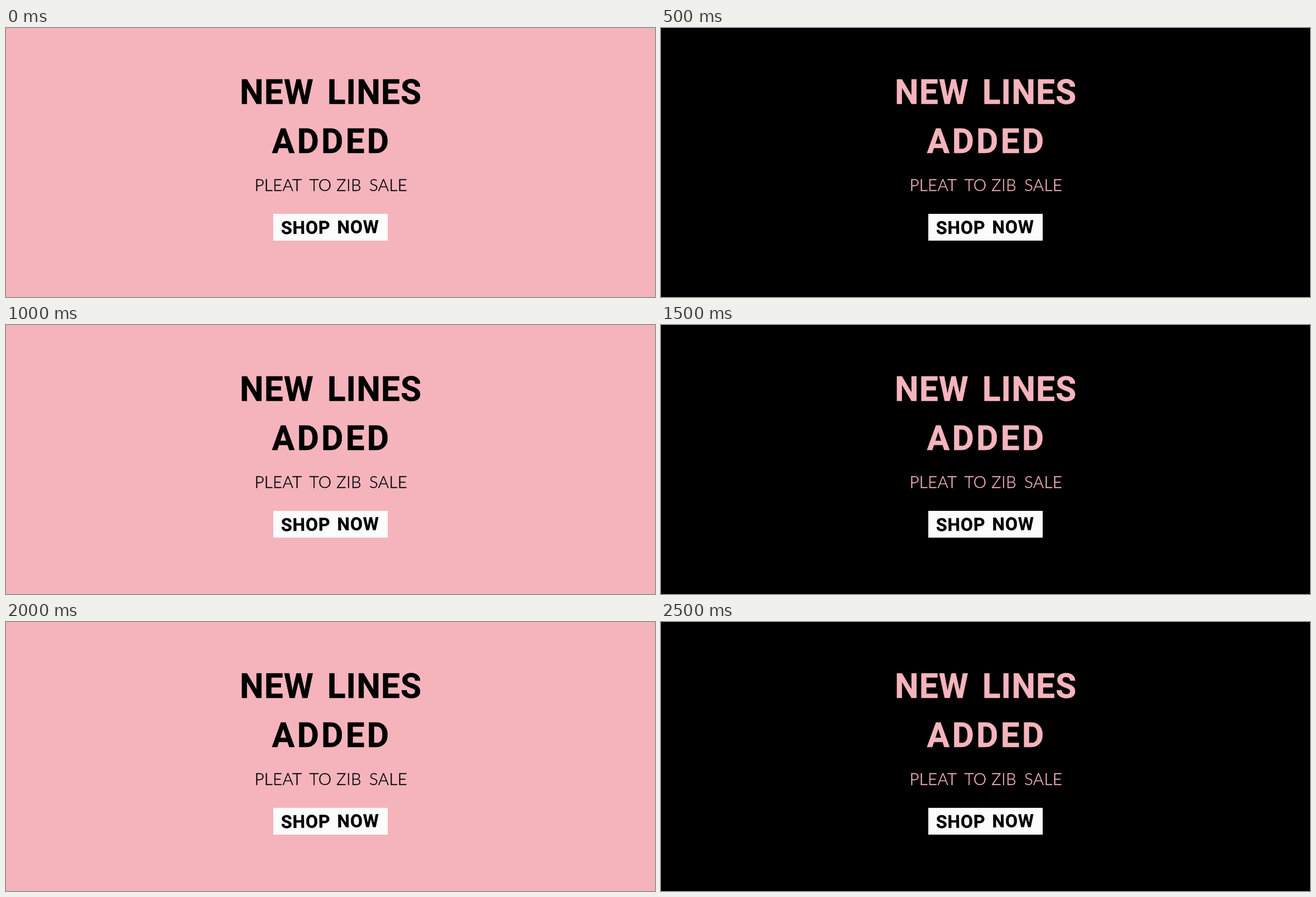
Recreate the animation shown at these times as an HTML page. Size 1163 px wide and 482 px high, loop 3000 ms.

```html
<!DOCTYPE html>
<html lang="en">
<head>
<meta charset="utf-8">
<title>New lines added</title>
<style>
  :root { --pink: #f5b4bc; }
  html, body { margin: 0; width: 100%; height: 100%; overflow: hidden; }
  svg {
    display: block;
    width: 1163px;
    height: 482px;
    animation: invert 1s step-end infinite;
  }
  text { fill: currentColor; stroke: currentColor; stroke-width: .4px; }
  .bold { font-family: Roboto, "Open Sans", sans-serif; font-weight: 700; }
  .title { font-size: 60.5px; }
  .sub { font: 300 29.5px Lato, "Open Sans", sans-serif; letter-spacing: .3px; }
  .button { color: #000; }
  .button text { font-size: 32px; letter-spacing: .9px; word-spacing: 3px; }

  @keyframes invert {
    0%, 100% { background: var(--pink); color: #000; }
    50% { background: #000; color: var(--pink); }
  }
</style>
</head>
<body>
<svg viewBox="0 0 1163 482">
  <text class="bold title" x="419" y="136.4" letter-spacing="1" word-spacing="8">NEW LINES</text>
  <text class="bold title" x="476.5" y="223.7" letter-spacing="4.2">ADDED</text>
  <text class="sub" y="292.1"><tspan x="445.5">PLEAT</tspan> <tspan x="543.5">TO</tspan> <tspan x="592">ZIB</tspan> <tspan x="651">SALE</tspan></text>
  <g class="button">
    <rect x="479" y="333" width="205" height="48" fill="#fcfcfc"/>
    <text class="bold" x="493" y="369.2" transform="rotate(-.65 493 369.2)">SHOP NOW</text>
  </g>
</svg>
</body>
</html>
```
